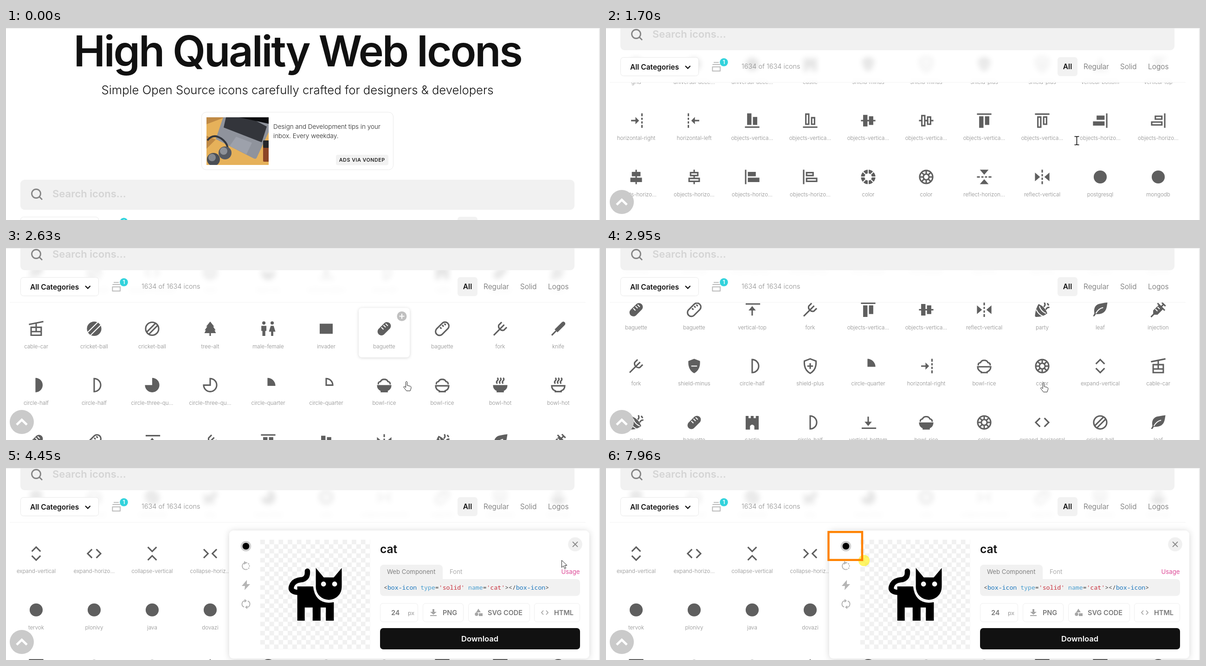
Write an HTML page that moves like this. It is 1280x415 px and loops after 8000 ms.

```html
<!DOCTYPE html>
<html lang="en">
<head>
<meta charset="utf-8">
<title>High Quality Web Icons</title>
<style>
html, body { margin: 0; width: 100%; height: 100%; overflow: hidden; background: #fff; }
#stage { position: relative; width: 1280px; height: 415px; overflow: hidden; }
svg { position: absolute; left: 0; top: 0; display: block; font-family: Inter, sans-serif; }
#head { position: absolute; left: 8px; top: 311px; width: 1241px; height: 152px;
  background: rgba(255,255,255,.83); backdrop-filter: blur(6px); }
.card { filter: drop-shadow(0 1px 3px rgba(0,0,0,.16)); }
#modal > .panel { filter: drop-shadow(0 1px 7px rgba(0,0,0,.16)); }
</style>
</head>
<body>
<div id="stage">
  <svg id="page" width="1280" height="415"></svg>
  <div id="head"></div>
  <svg id="top" width="1280" height="415"></svg>
</div>
<script>
const LOOP = 8000, STEP = 121.8, FIRST = 530, STICK = 345, GREY = '#5f5f5f';
const $ = id => document.getElementById(id);
const clamp = v => Math.max(0, Math.min(1, v));

// ---- markup helpers ----
const text = (x, y, size, weight, fill, str, anchor = 'start', extra = '') =>
  `<text x="${x}" y="${y}" font-size="${size}" font-weight="${weight}" fill="${fill}" text-anchor="${anchor}" ${extra}>${str}</text>`;
const rect = (x, y, w, h, r, fill, stroke = 'none', extra = '') =>
  `<rect x="${x}" y="${y}" width="${w}" height="${h}" rx="${r}" fill="${fill}" stroke="${stroke}" ${extra}/>`;
const circle = (x, y, r, fill) => `<circle cx="${x}" cy="${y}" r="${r}" fill="${fill}"/>`;
const line = (d, color, width, extra = '') =>
  `<path d="${d}" fill="none" stroke="${color}" stroke-width="${width}" ${extra}/>`;
const shape = (d, fill) => `<path d="${d}" fill="${fill}"/>`;
const ring = (r, x = 12, y = 12) => `M${x - r} ${y}a${r} ${r} 0 1 0 ${2 * r} 0a${r} ${r} 0 1 0 ${-2 * r} 0z`;

// ---- icons on a 24 unit grid: [filled, stroked, white strokes] ----
const loaf = 'M4 12.4 12.4 4a5.4 5.4 0 0 1 7.6 7.6L11.6 20A5.4 5.4 0 0 1 4 12.4z';
const shield = 'M12 2l8 3q1 12-8 17-9-5-8-17z';
const rice = 'M4 11q-1-3 3-4 1-3 5-3t5 3q4 1 3 4';
const bowl = 'M2 12h20q0 6-5 8v2H7v-2q-5-2-5-8z', bowlLine = 'M3 13h18q0 5-5 7v1H8v-1q-5-2-5-7z';
const steam = 'M8 2q2 2 0 4t0 4M12 2q2 2 0 4t0 4M16 2q2 2 0 4t0 4';
const dashV = x => `M${x} 2v4M${x} 8v3M${x} 13v3M${x} 18v4`;
const icons = {
  'horizontal-right': ['M11 7v10l5-5z', 'M5 12h7' + dashV(20)],
  'horizontal-left': ['M13 7v10l-5-5z', 'M19 12h-7' + dashV(4)],
  ov1: ['M5 2h6v16H5zM13 7h6v11h-6z', 'M2 21h20'],
  ov2: ['', 'M6 3h4v14H6zM14 8h4v9h-4zM2 21h20'],
  ov3: ['M5 4h6v16H5zM13 6h6v12h-6z', 'M2 12h20'],
  ov4: ['', 'M6 5h4v14H6zM14 7h4v10h-4zM2 12h3M11 12h2M19 12h3'],
  ov5: ['M5 6h6v16H5zM13 6h6v12h-6z', 'M2 3h20'],
  ov6: ['', 'M6 7h4v14H6zM14 7h4v10h-4zM2 3h20'],
  oh1: ['M7 5h11v6H7zM2 13h16v6H2z', 'M21 2v20'],
  oh2: ['', 'M8 6h9v4H8zM3 14h14v4H3zM21 2v20'],
  oh3: ['M6 5h12v6H6zM4 13h16v6H4z', 'M12 2v20'],
  oh4: ['', 'M7 6h10v4H7zM5 14h14v4H5zM12 2v3M12 11v2M12 19v3'],
  oh5: ['M6 5h11v6H6zM6 13h16v6H6z', 'M3 2v20'],
  oh6: ['', 'M7 6h9v4H7zM7 14h14v4H7zM3 2v20'],
  color: [ring(10) + ring(5), '', 'M12 1v22M1 12h22M4 4l16 16M20 4 4 20'],
  color2: ['', ring(9) + ring(4) + 'M12 3v5M12 16v5M3 12h5M16 12h5M6 6l3 3M15 15l3 3M18 6l-3 3M9 15l-3 3'],
  'reflect-horizontal': ['M6 2h12l-6 7zM6 22h12l-6-7z', 'M2 12h4M8 12h3M13 12h3M18 12h4'],
  'reflect-vertical': ['M2 6v12l7-6zM22 6v12l-7-6z', dashV(12)],
  'cable-car': ['', 'M2 6l20-4M12 4v6M5 10h14v11H5zM5 16h14M12 10v6'],
  'cricket-ball': [ring(10), '', 'M3 17 17 3M7 21 21 7'],
  'cricket-ball2': ['', ring(9) + 'M4 17 17 4M7 20 20 7'],
  'tree-alt': ['M12 2 6.5 9H8l-3.5 5H6l-2 4h7v4h2v-4h7l-2-4h1.5L16 9h1.5z'],
  'male-female': [ring(2.3, 6, 4) + ring(2.3, 17.5, 4) + 'M2.5 8h7v7H8v7H4v-7H2.5zM15.5 8h4l2.5 8h-3v6h-3v-6h-3z'],
  invader: ['M3 5h18v14H3z'],
  baguette: [loaf, '', 'M8 10l3 3M11 7l3 3M14 5l3 3'],
  baguette2: ['', loaf + 'M9 10l2 2M12 7l2 2M15 5l2 2'],
  fork: ['', 'M3 21l10-10M14 3l-4 4q-1 3 1.5 5.5T17 14l4-4M17.5 6.5 13 11'],
  knife: ['M21 3q-2-2-4 0L7 13l4 4 9-9q3-2.5 1-5z', 'M9 15l-6 6'],
  'circle-half': ['M11 2a10 10 0 0 1 0 20z'],
  'circle-half2': ['', 'M12 3a9 9 0 0 1 0 18z'],
  'circle-three': ['M12 2a10 10 0 1 1-10 10h10z'],
  'circle-three2': ['', 'M12 3a9 9 0 1 1-9 9h9z'],
  'circle-quarter': ['M11 2a11 11 0 0 1 11 11H11z'],
  'circle-quarter2': ['', 'M12 3a9 9 0 0 1 9 9h-9z'],
  'bowl-rice': [bowl, rice], 'bowl-rice2': ['', rice + bowlLine],
  'bowl-hot': [bowl, steam], 'bowl-hot2': ['', steam + bowlLine],
  'expand-vertical': ['', 'M6 9l6-6 6 6M6 15l6 6 6-6'],
  'expand-horizontal': ['', 'M9 6l-6 6 6 6M15 6l6 6-6 6'],
  'collapse-vertical': ['', 'M6 3l6 6 6-6M6 21l6-6 6 6'],
  'collapse-horizontal': ['', 'M3 6l6 6-6 6M21 6l-6 6 6 6'],
  'collapse-alt': ['', 'M14 2v8h8M2 14h8v8'],
  party: ['M2 20Q3 10 7 4q9 4 12 13-6 5-15 5-2 0-2-2z', 'M14 8q3-2 1-6M17 12q2-4 5-3M19 3l2 3', 'M4 12q2 6 9 9M8 7q2 7 9 10'],
  leaf: ['M22 2Q20 2 10 4 2 7 4 17l-2 4h2l2-3q13 1 15-10z', '', 'M6 17Q10 10 16 9'],
  injection: ['M5 13l8-8 6 6-8 8H5z', 'M2 22l5-5M11 3l10 10M16 8l4-4M17 2l5 5', 'M8 11l3 3M11 8l3 3'],
  dog: ['M2 8l2-1 1 3h8l3-8 2 3h4v3q0 4-5 4v10h-4v-5H9v5H4v-9q-2-2-2-5z' + ring(.9, 17, 7)],
  cat: ['M12.2 2l3 3.6h3.8l3-3.6v7.2a4.9 4.9 0 0 1-9.8 0z' + ring(.95, 15.1, 8.1) + ring(.95, 19.3, 8.1) +
    'M5.2 9h6q.6 6 6 6.2 1 0 1.8-.2v7h-3v-5h-2v5h-3v-5H8v5H5.2z', 'M9 3.2q.3 3-2.5 3.3T3 9t3 2.3h1'],
  castle: ['M3 3h4v3h3V3h4v3h3V3h4v19h-6v-5q-3-4-6 0v5H3z'],
  'shield-minus': [shield, '', 'M8 12h8'], 'shield-minus2': ['', shield + 'M8 12h8'],
  'shield-plus': [shield, '', 'M8 12h8M12 8v8'], 'shield-plus2': ['', shield + 'M8 12h8M12 8v8'],
  'vertical-bottom': ['M7 11h10l-5 6z', 'M12 4v8M3 20h20'],
  'vertical-top': ['M7 13h10l-5-6z', 'M12 20v-8M3 4h20'],
};
const icon = (key, x, y, color = GREY, scale = 1.56) => {
  const [fill, stroke, white] = icons[key] || [ring(9)];
  return `<g transform="translate(${x} ${y}) scale(${scale}) translate(-12 -12)" fill-rule="evenodd" stroke-linecap="${key == 'cat' ? 'round' : 'butt'}">
    ${shape(fill, color)}${stroke ? line(stroke, color, 2) : ''}${white ? line(white, '#fff', 1.3) : ''}</g>`;
};

// ---- icon rows: key or key=label ----
const V = '=objects-vertica...', H = '=objects-horizo...';
const rows = {
  4: 'grid,ua=universal-acce...,ua2=universal-acce...,castle,shield-minus,shield-minus2,shield-plus,shield-plus2,vertical-bottom,vertical-top',
  5: `horizontal-right,horizontal-left,ov1${V},ov2${V},ov3${V},ov4${V},ov5${V},ov6${V},oh1${H},oh2${H}`,
  6: `oh3${H},oh4${H},oh5${H},oh6${H},color,color2,reflect-horizontal=reflect-horizon...,reflect-vertical,postgresql,mongodb`,
  13: 'cable-car,cricket-ball,cricket-ball2,tree-alt,male-female,invader,baguette,baguette2,fork,knife',
  14: 'circle-half,circle-half2,circle-three=circle-three-qu...,circle-three2=circle-three-qu...,circle-quarter,circle-quarter2,bowl-rice,bowl-rice2,bowl-hot,bowl-hot2',
  15: `baguette,baguette2,vertical-top,fork,ov5${V},ov3${V},reflect-vertical,party,leaf,injection`,
  21: 'expand-vertical,expand-horizontal=expand-horizo...,collapse-vertical,collapse-horizontal=collapse-horiz...,collapse-alt,party,leaf,injection,dog,cat',
  22: 'tervok,plonivy,java,dovazi,go-lang,zorpa,flask,58sketors,lurpo,qr',
  23: `ov5${V},bowl-rice2,bowl-rice,tree-alt,color2,bowl-rice2,bowl-rice,ov5${V},ov6${V},cricket-ball`,
};
const keys = Object.keys(icons).filter(k => !/^o[vh]\d/.test(k));
const filler = r => Array.from({ length: 10 }, (_, c) => keys[(r * 17 + c * 7 + r * c) % keys.length]).join();
const rowY = r => FIRST + r * STEP;
const grid = () => {
  let out = '';
  for (let r = 0; r < 25; r++)
    (rows[r] || filler(r)).split(',').forEach((token, c) => {
      const [key, label = key.replace(/\d$/, '')] = token.split('=');
      const x = 65 + c * 125;
      out += icon(key, x, rowY(r)) + text(x, rowY(r) + 42.2, 11.6, 300, '#8c8c8c', label, 'middle');
    });
  return out;
};
const hoverCard = (id, x, y) => `<g id="${id}">${rect(x - 55, y - 45, 110, 107, 7, '#fff', 'none', 'class="card"')}
  ${circle(x + 38, y - 27, 10.5, '#c0c0c0')}${line(`M${x + 32.5} ${y - 27}h11M${x + 38} ${y - 32.5}v11`, '#fff', 2)}</g>`;

const photo = `<svg x="432" y="193" width="134" height="103" viewBox="0 0 134 103">
  ${rect(0, 0, 134, 103, 0, '#e6b15a')}${shape('M0 15 40 0H0zM0 40l20 8-20 20z', '#c08a45')}
  ${shape('M36 0h98v32l-26 56q-2 3-6 1L20 47z', '#8f939c')}${shape('M42 0h50l38 20-11 34-82-32z', '#33353b')}
  ${shape('M70 0h64v14z', '#0c0d10')}${shape('M64 42l34 13-12 25-36-18z', '#9da1ab')}
  ${line('M2 50Q14 34 32 46 46 56 46 70', '#34373d', 4)}${circle(15, 91, 14, '#4a4e55')}${circle(40, 77, 14, '#565a62')}
  ${circle(12, 87, 8, '#85898f')}${circle(37, 73, 8, '#8d9198')}
  ${rect(122, 50, 14, 46, 2, '#8c4526')}${rect(122, 50, 14, 16, 2, '#26262a')}</svg>`;

$('page').innerHTML = `<g id="scroll">
  ${text(628, 83, 92, 600, '#111', 'High Quality Web Icons', 'middle', 'letter-spacing="-.035em"')}
  ${text(628, 143, 25.7, 300, '#111', 'Simple Open Source icons carefully crafted for designers &amp; developers', 'middle')}
  ${rect(421.5, 182, 413, 124.5, 10, '#fff', '#e9e9e9')}${photo}
  ${text(576, 218.3, 13.5, 300, '#222', 'Design and Development tips in your')}
  ${text(576, 238.3, 13.5, 300, '#222', 'inbox. Every weekday.')}
  ${rect(711, 274, 113, 22.5, 4, '#f2f2f2')}
  ${text(767.3, 289.2, 10.8, 600, '#222', 'ADS VIA VONDEP', 'middle', 'letter-spacing=".5"')}
  ${hoverCard('hoverLoaf', 815, rowY(13))}${hoverCard('hoverCat', 1190, rowY(21))}${grid()}</g>`;

$('head').innerHTML = `<svg width="1241" height="152" viewBox="8 311 1241 152">
  ${rect(31, 328, 1194, 65, 9, '#f1f1f1')}
  ${line(ring(9.5, 65, 358) + 'M72 365l6 6', '#858585', 2.8)}${text(100, 366, 22, 600, '#d4d4d4', 'Search icons...')}
  ${rect(31.5, 408.5, 168, 40, 6, '#fff', '#e9e9e9')}${text(52, 434.5, 15.5, 600, '#111', 'All Categories')}
  ${line('M171 427l5.3 5.3 5.3-5.3', '#111', 2.3)}
  ${line('M232 419.5h11M229.5 424h17M229.5 429h16.5v9h-16.5z', '#bcbcbc', 2)}
  ${circle(254, 419, 8.8, '#32d3dc')}${text(254, 423.2, 12, 600, '#fff', '1', 'middle')}
  ${text(292, 433, 14.5, 300, '#8f8f8f', '1634 of 1634 icons')}
  ${rect(973, 408, 43, 41, 6, '#f2f2f2')}${text(994.5, 434, 15.5, 600, '#111', 'All', 'middle')}
  ${text(1029, 434, 15.5, 300, '#666', 'Regular')}${text(1108, 434, 15.5, 300, '#666', 'Solid')}${text(1168, 434, 15.5, 300, '#666', 'Logos')}
  ${line('M8 462.5h1241', '#f3f3f3', 1)}</svg>`;

const span = (color, str) => `<tspan fill="${color}">${str}</tspan>`;
const tag = span('#1a76bd', 'box-icon');
const attr = (name, value) => ' ' + span('#4a9fd0', name) + '=' + span('#c9303c', `'${value}'`);
const box = (x, w) => rect(x + .5, 292.5, w, 40, 6, '#fff', '#eee');

$('top').innerHTML = `<g id="up">${circle(34, 376, 26, '#cacaca')}${line('M23 382l11-10.5 11 10.5', '#fff', 5)}</g>
  <g id="modal">${rect(481, 135, 776, 277, 9, '#fff', 'none', 'class="panel"')}
  ${circle(517, 169, 11.3, '#cfcfcf')}${circle(517, 169, 7.3, '#000')}
  ${line('M517 204.5a7.5 7.5 0 0 1 0 15', '#b5b5b5', 2, 'stroke-dasharray="3 2"')}
  ${line('M517 219.5a7.5 7.5 0 0 1-3-14.5', '#b5b5b5', 2)}${shape('M513 201l6 4-6 4z', '#b5b5b5')}
  ${shape('M519 242l-11 13h7l-1 9 12-13h-7z', '#b5b5b5')}
  ${line('M513 300.5a7 7 0 0 1 2-13.5M521 287.5a7 7 0 0 1-2 13.5', '#b5b5b5', 2)}
  ${shape('M514 283l5 4-5 4zM520 297l-5 4 5 4z', '#b5b5b5')}
  <pattern id="checks" x="548" y="155" width="19.7" height="19.7" patternUnits="userSpaceOnUse">
    ${shape('M0 0h9.85v19.7h9.85V9.85H0z', '#f1f1f1')}</pattern>
  ${rect(548, 155, 237, 237, 0, 'url(#checks)')}${icon('cat', 666.5, 273, '#000', 5.7)}
  ${text(806, 184, 24.5, 600, '#111', 'cat')}
  ${circle(1226.5, 165, 15.3, '#f0f0f0')}${line('M1221 159.5l11 11M1232 159.5l-11 11', '#8a8a8a', 1.8)}
  ${rect(806, 209, 135, 45, 8, '#f1f1f1')}${rect(806, 240, 431, 36.5, 8, '#f1f1f1')}
  ${text(821, 228.5, 13.2, 400, '#808080', 'Web Component')}${text(956, 228.5, 13.2, 400, '#ababab', 'Font')}
  ${text(1236.5, 228.5, 13.2, 400, '#dd4a97', 'Usage', 'end')}
  ${text(814, 262.5, 13.2, 400, '#444', `&lt;${tag}${attr('type', 'solid')}${attr('name', 'cat')}&gt;&lt;/${tag}&gt;`, 'start',
    `style="font-family:'Noto Sans Mono',monospace;white-space:pre"`)}
  ${box(806, 81)}${box(898, 87)}${box(996, 132)}${box(1138, 98)}
  ${text(830, 317.5, 14.5, 600, '#777', '24')}${text(866, 318, 12.5, 400, '#999', 'px')}
  ${shape('M919 305h4v6h5l-7 6-7-6h5z', '#a5a5a5')}${line('M914 319h14', '#a5a5a5', 2)}${text(941, 317.5, 14.5, 600, '#777', 'PNG')}
  ${shape('M1018 304l5 8h-10zM1019 314h8v6h-8z' + ring(3.7, 1014, 316), '#a5a5a5')}${text(1038, 317.5, 14.5, 600, '#777', 'SVG CODE')}
  ${line('M1158 308l-4 4.5 4 4.5M1164 308l4 4.5-4 4.5', '#a5a5a5', 1.8)}${text(1181, 317.5, 14.5, 600, '#777', 'HTML')}
  ${rect(806, 346, 431, 46, 7, '#111')}${text(1021, 374.5, 16.5, 600, '#fff', 'Download', 'middle')}</g>
  <circle id="glow" r="12.2" fill="#fff000" opacity=".6"/>
  <circle id="dot" r="2.6" fill="#d27a2c"/>
  <rect id="frame" x="479.5" y="138.3" fill="none" stroke="#ff8200" stroke-width="4.5"/>
  <g id="cursor" fill="#fff" stroke="#222"><path id="arrow" d="M.5.5v15.5l3.7-3.5 2.6 6 2.7-1.2-2.6-5.8H12z"/>
    <path id="hand" d="M-1.5 1.5q1.5-3 3 0V9l7 1.8q2 .7 1.5 4l-2 6H0L-6 13q0-3 3-1l1.5 1.5z"/>
    <path id="beam" d="M-5 .5h3.5q1.5 0 1.5 1.5 0-1.5 1.5-1.5H5M0 1v17M-5 18.5h3.5Q0 18.5 0 17q0 1.5 1.5 1.5H5" fill="none" stroke="#000" stroke-width="1.5"/></g>
  ${line('M0 .5h1280', '#e6e6e6', 1)}${line('M1279 0v415', '#e9e9e9', 2)}`;

// ---- motion ----
const track = (points, t) => {
  if (t <= points[0][0]) return points[0].slice(1);
  for (let i = 1; i < points.length; i++) {
    const [a, ...from] = points[i - 1], [b, ...to] = points[i];
    if (t <= b) return from.map((v, j) => v + (to[j] - v) * (t - a) / (b - a));
  }
  return points[points.length - 1].slice(1);
};
const scrollPath = [[1040, 0], [1090, 6], [1160, 40], [1300, 240], [1700, 938], [1890, 1095], [1960, 1105],
  [2630, rowY(13) - 175.3], [2760, 2040], [2820, 2046], [3000, 2290], [3380, 2870], [3490, rowY(21) - 185]];
const cursorPath = [[70, 1204, 374], [250, 1150, 330], [610, 1013, 239], [1300, 1013, 239], [1400, 1014.5, 234],
  [2100, 1014.5, 234], [2550, 863, 288], [2820, 863, 288], [3450, 1246, 300], [3690, 1260, 222],
  [4110, 1197, 199], [4660, 1197, 199], [5000, 1000, 222], [5470, 704, 224]];
const dotPath = [[5480, 704, 224], [5810, 551.5, 149], [5950, 551.5, 149], [6350, 510, 137],
  [6690, 481.5, 138.5], [7400, 481.5, 138.5], [7420, 481, 138.5], [7610, 481, 138.5], [7620, 480.3, 138.5]];

const show = (id, visible) => $(id).setAttribute('visibility', visible ? 'visible' : 'hidden');
const move = (id, x, y) => $(id).setAttribute('transform', `translate(${x} ${y})`);

function draw(t) {
  const [scroll] = track(scrollPath, t);
  move('scroll', 0, -scroll);
  $('head').style.transform = `translateY(${-Math.min(scroll, STICK)}px)`;
  $('up').setAttribute('opacity', clamp((scroll - 350) / 200));
  $('modal').setAttribute('opacity', clamp((t - 4250) / 190));
  show('hoverLoaf', t > 2480 && t < 2760);
  show('hoverCat', t > 3830);

  const [x, y] = track(cursorPath, t);
  move('cursor', x, y);
  const visible = (t >= 70 && t < 3450) || (t >= 3690 && t < 5520);
  const beam = t > 1250 && t < 2100, hand = (t >= 2100 && t < 3450) || (t > 3800 && t < 4400);
  show('beam', visible && beam);
  show('hand', visible && hand);
  show('arrow', visible && !beam && !hand);

  const drag = t < 7885 ? 0 : t < 7950 ? .5 : 1;
  move('dot', ...track(dotPath, t));
  show('dot', t >= 5520 && !drag);
  move('glow', 481 + 75 * drag, 140 + 60 * drag);
  show('glow', t >= 7815);
  $('frame').setAttribute('width', 72.5 * drag);
  $('frame').setAttribute('height', 60.5 * drag);
  show('frame', drag > 0);
}
function tick() {
  draw(performance.now() % LOOP);
  requestAnimationFrame(tick);
}
tick();
</script>
</body>
</html>
```
